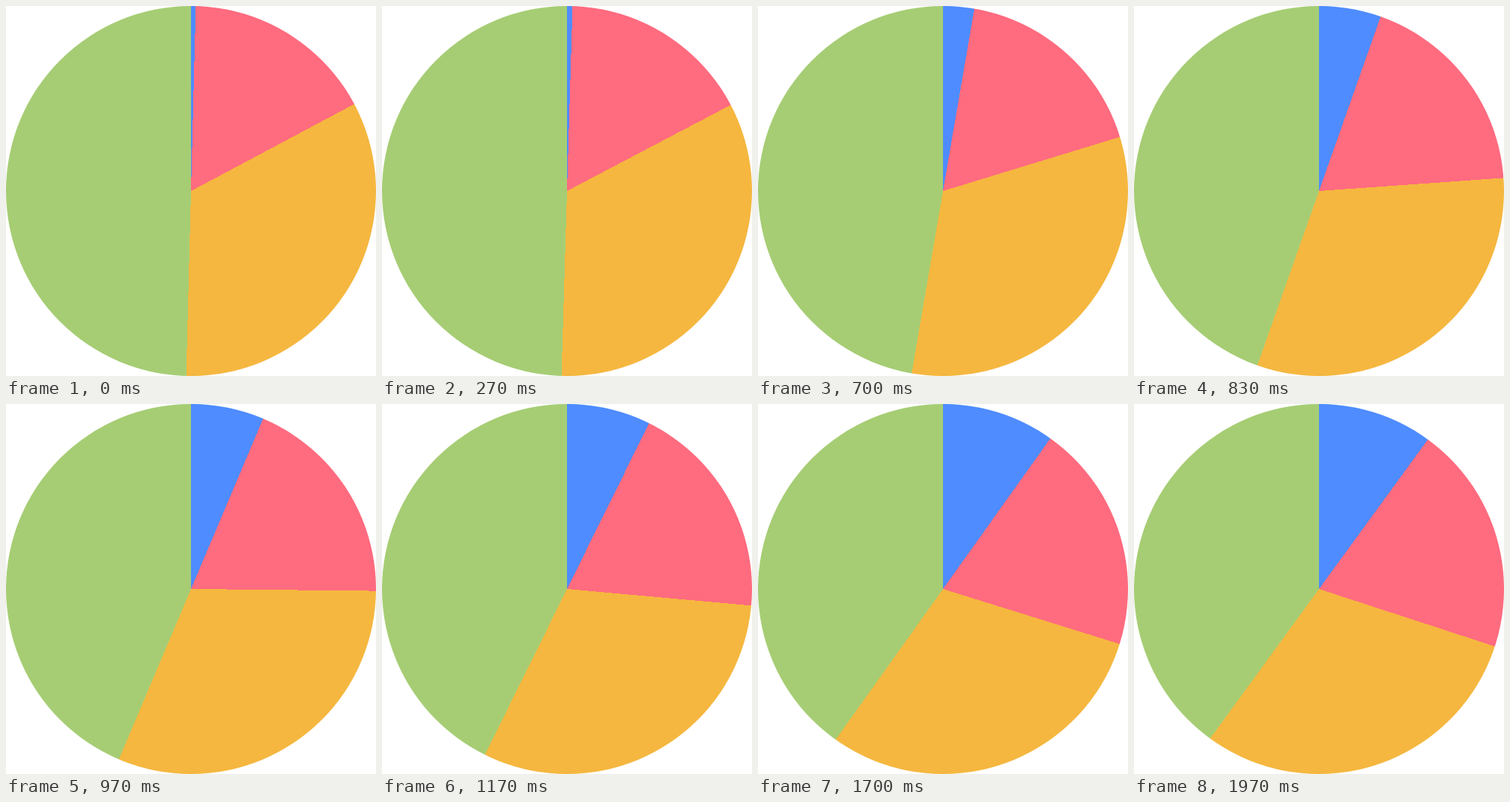
An HTML page for the animation above (2000 ms loop, 500x500 px).

```html
<!DOCTYPE html>
<html lang="en">
<head>
<meta charset="utf-8">
<title>Bouncing pie</title>
<style>
  html, body {
    margin: 0;
    width: 100%;
    height: 100%;
    overflow: hidden;
    background: #fff;
  }
  #pie {
    width: 500px;
    height: 500px;
    border-radius: 50%;
  }
</style>
</head>
<body>
<div id="pie"></div>
<script>
  const LOOP = 2000;
  const STEPS = 60;
  const COLORS = ['#4e8cff', '#ff6b7f', '#f5b73f', '#a6cd74'];
  const FIRST = 0.025;
  const GROWTH = 0.985;
  const pie = document.getElementById('pie');

  function bounceOut(t) {
    const k = 7.5625, d = 2.75;
    if (t < 1 / d) return k * t * t;
    if (t < 2 / d) return k * (t - 1.5 / d) ** 2 + 0.75;
    if (t < 2.5 / d) return k * (t - 2.25 / d) ** 2 + 0.9375;
    return k * (t - 2.625 / d) ** 2 + 0.984375;
  }

  function bounceInOut(t) {
    return t < 0.5
      ? (1 - bounceOut(1 - 2 * t)) / 2
      : (1 + bounceOut(2 * t - 1)) / 2;
  }

  // 30 steps a second, each starting on a multiple of 10 ms
  function stepAt(ms) {
    return Math.floor((Math.floor(ms / 10) + 0.34) * 0.3);
  }

  function draw(progress) {
    const base = FIRST + GROWTH * bounceInOut(progress);
    const total = 6 + 4 * base;
    let angle = 0;
    const slices = COLORS.map((color, i) => {
      const from = angle;
      angle += 360 * (base + i) / total;
      return `${color} ${from}deg ${angle}deg`;
    });
    pie.style.background = `conic-gradient(${slices.join(',')})`;
  }

  const start = performance.now();

  function tick() {
    draw(stepAt((performance.now() - start) % LOOP) / STEPS);
    requestAnimationFrame(tick);
  }

  tick();
</script>
</body>
</html>
```
